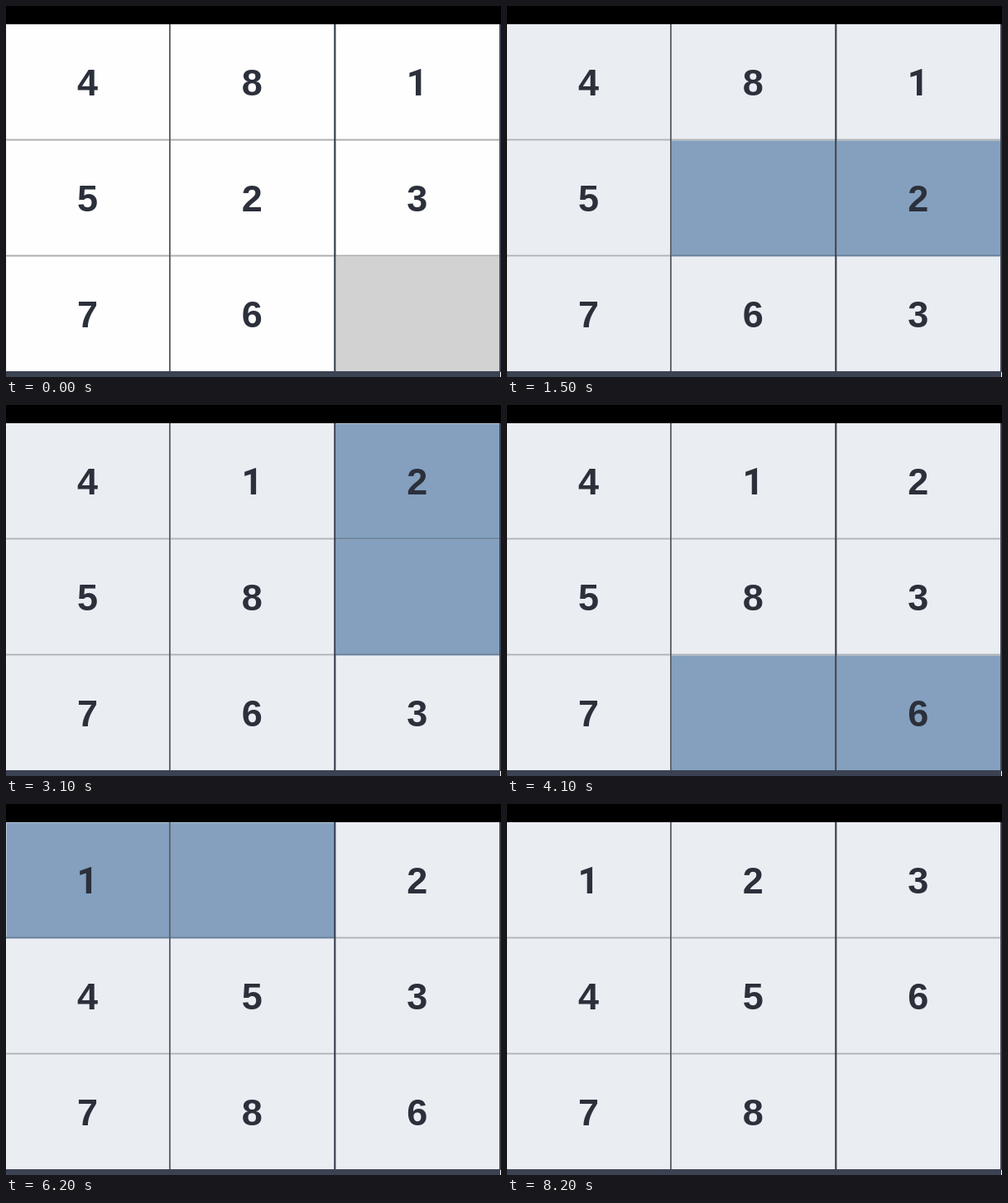
Animation, 598 px wide and 448 px high, one loop 8400 ms. Source, as an HTML page:

```html
<!DOCTYPE html>
<html lang="en">
<head>
<meta charset="utf-8">
<title>Sliding puzzle</title>
<style>
  html, body { margin: 0; width: 100%; height: 100%; overflow: hidden; background: #000; }
  svg { display: block; width: 598px; height: 448px; }
  text { font: bold 45px "Liberation Sans", Arial, sans-serif; fill: #2b303b; text-anchor: middle; }
  /* a numeral one without a foot */
  text.one { font-family: Roboto, sans-serif; }
</style>
</head>
<body>
<svg id="stage" viewBox="0 0 598 448"></svg>
<script>
const LOOP = 8400, WAKE = 600, DONE = 8200;
const START = [4, 8, 1, 5, 2, 3, 7, 6, 0];
// [time, cell the gap moves to]
const MOVES = [
  [1000, 5], [1500, 4], [2000, 1], [2600, 2], [3000, 5], [3600, 8], [4100, 7],
  [4600, 4], [5100, 3], [5700, 0], [6200, 1], [6700, 2], [7200, 5], [7700, 8]
];
const LEFT = [0, 198, 398], RIGHT = [197, 397, 596], MID = [98.5, 297.3, 496.7];
const TOP = [22, 162, 302], BOTTOM = [161, 301, 441];
const THEMES = {
  white: { fill: '#fefefe', edge: '#ebebeb', line: '#adadad' },
  gray:  { fill: '#d2d2d2', edge: '#e6e6e6', line: '#bdbdbd' },
  light: { fill: '#eaedf2', edge: '#edeff4', line: '#adb0b4' },
  blue:  { fill: '#84a0be', edge: '#b4c5d7', line: '#667d95' }
};
const stage = document.getElementById('stage');

function add(tag, attrs) {
  const el = document.createElementNS('http://www.w3.org/2000/svg', tag);
  for (const key in attrs) el.setAttribute(key, attrs[key]);
  return stage.appendChild(el);
}
function rect(x, y, width, height, fill) {
  return add('rect', { x, y, width, height, fill });
}

rect(0, 0, 598, 448, '#000');
rect(0, 22, 598, 426, '#3b4252');
rect(597, 442, 1, 6, '#fff');

const cells = START.map((_, i) => {
  const c = i % 3, r = Math.floor(i / 3);
  const x = LEFT[c], y = TOP[r], w = RIGHT[c] - x, h = BOTTOM[r] - y;
  return {
    edge: rect(x, y, w, h),
    fill: rect(x + 1, y + 1, w - 1, h - 1),
    label: add('text', { x: MID[c], y: 108 + r * 140 })
  };
});

// soft lines below the first two rows
cells.slice(0, 6).forEach((cell, i) => {
  const c = i % 3, r = Math.floor(i / 3);
  cell.line = rect(LEFT[c], BOTTOM[r] - 0.4, RIGHT[c] - LEFT[c], 1.8);
});

rect(197, 22, 1.8, 419, '#575b66');
rect(396.2, 22, 2.2, 419, '#3b4252');

function stateAt(t) {
  const board = START.slice();
  let gap = 8, lit = [];
  for (const [time, to] of MOVES) {
    if (t < time) break;
    board[gap] = board[to];
    board[to] = 0;
    lit = [gap, to];
    gap = to;
  }
  return { board, lit: t < DONE ? lit : [] };
}

function draw(t) {
  const { board, lit } = stateAt(t);
  cells.forEach((cell, i) => {
    const name = t < WAKE ? (board[i] ? 'white' : 'gray') : lit.includes(i) ? 'blue' : 'light';
    const theme = THEMES[name];
    for (const part of ['edge', 'fill', 'line']) {
      if (cell[part]) cell[part].setAttribute('fill', theme[part]);
    }
    cell.label.textContent = board[i] || '';
    cell.label.classList.toggle('one', board[i] === 1);
  });
}

function tick() {
  draw(performance.now() % LOOP);
  requestAnimationFrame(tick);
}
tick();
</script>
</body>
</html>
```
